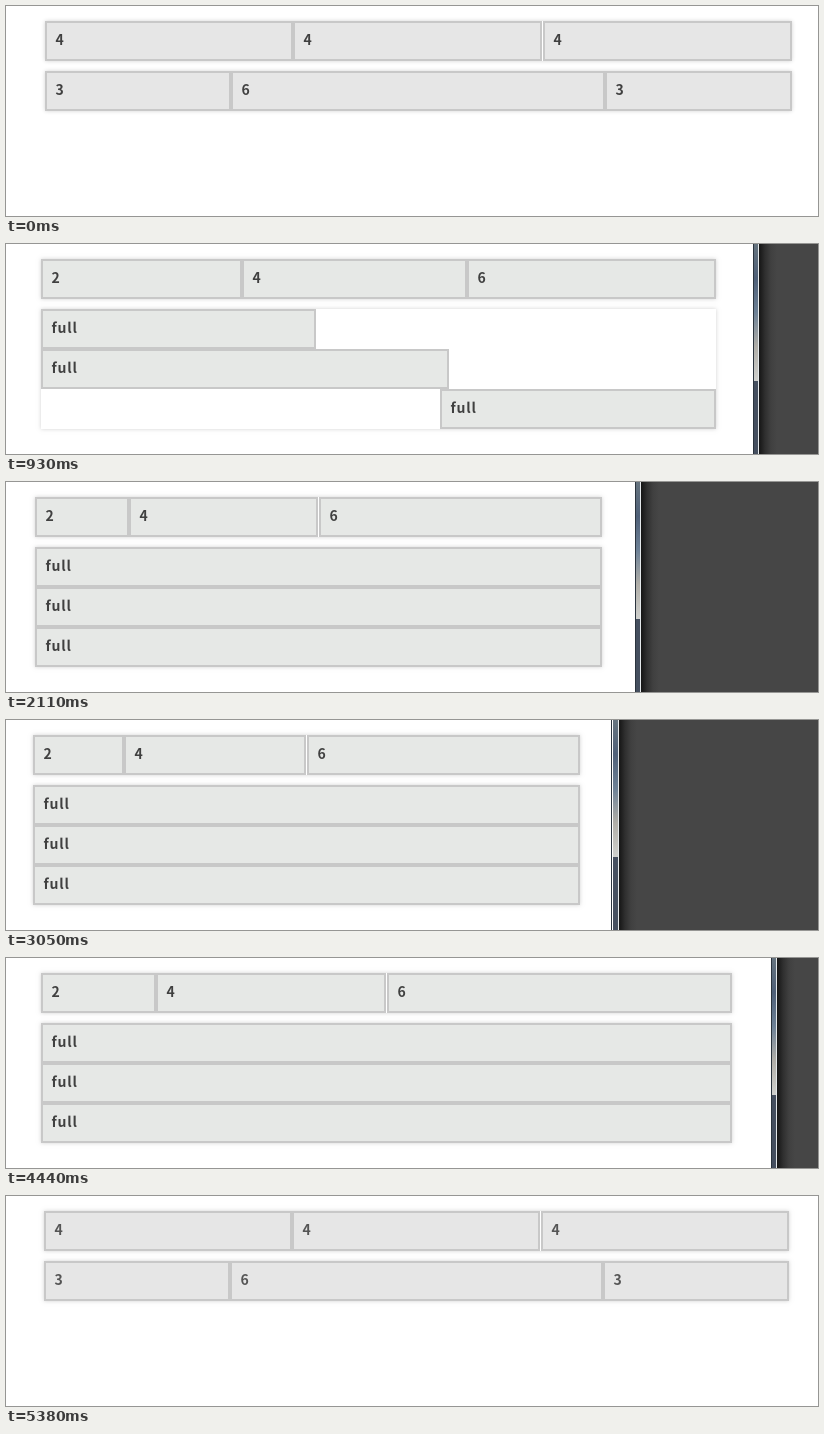
Recreate the animation shown at these times as an HTML page with a canvas. Size 812 by 210 pixels, loop 5.54 s.

```html
<!DOCTYPE html>
<html lang="en">
<head>
<meta charset="utf-8">
<title>Responsive grid</title>
<style>
html, body { margin: 0; width: 100%; height: 100%; overflow: hidden; background: #fff; }
canvas { display: block; }
</style>
</head>
<body>
<canvas id="stage" width="812" height="210"></canvas>
<script>
const ctx = document.getElementById('stage').getContext('2d');
const WIDTH = 812, HEIGHT = 210, LOOP = 5540;
const FRAME = 208;            // longest hold while the window is dragged
const SHRINK_AT = 849, GROW_AT = 4700, DURATION = 500;

// Key poses of the drag: time, page width, distance from page to window border
const keys = [
  [0, 824.5, 10], [310, 821, 10], [930, 744.65, 8], [2110, 625.1, 10],
  [2480, 601.1, 12], [3050, 601.1, 12], [3820, 686.25, 13],
  [4440, 761.05, 10], [5210, 820, 11], [5380, 821, 11]
];

const rows = [
  { y: 15, wide: [.333, .333, .333], small: [.166, .333, .5],
    wideText: ['4', '4', '4'], smallText: ['2', '4', '6'] },
  { y: 65, wide: [.25, .5, .25], small: [1, 1, 1],
    wideText: ['3', '6', '3'], smallText: ['full', 'full', 'full'] }
];

const mix = (a, b, p) => a + (b - a) * p;

// The drag is seen in equal jumps between two key poses
function poseAt(time) {
  const i = keys.findLastIndex(k => k[0] <= time);
  const from = keys[i], to = keys[i + 1];
  if (!to) return from;
  const span = to[0] - from[0], count = Math.round(span / FRAME);
  const p = Math.floor((time - from[0]) / span * count) / count;
  return from.map((v, n) => mix(v, to[n], p));
}

// CSS "ease" curve, solved by bisection
function ease(x) {
  if (x <= 0) return 0;
  if (x >= 1) return 1;
  let lo = 0, hi = 1;
  for (let i = 0; i < 24; i++) {
    const s = (lo + hi) / 2;
    if (.75 * s * (1 - s) + s ** 3 < x) lo = s; else hi = s;
  }
  return .3 * lo * (1 - lo) ** 2 + 3 * lo * lo * (1 - lo) + lo ** 3;
}

function rect(x, y, w, h, color) {
  ctx.fillStyle = color;
  ctx.fillRect(x, y, w, h);
}

// Left floats with the last cell floated right, wrapping when a line is full
function place(widths, left, right) {
  const total = right - left;
  let x = left, line = 0;
  return widths.map((share, i) => {
    const w = share * total;
    if (x + w > right + .01) { x = left; line++; }
    const start = i === widths.length - 1 ? right - w : x;
    x += w;
    return { x0: Math.round(start), x1: Math.round(start + w), line };
  });
}

function drawRow(row, left, right, p, look) {
  const cells = place(row.wide.map((w, i) => mix(w, row.small[i], p)), left, right);
  const texts = look.small ? row.smallText : row.wideText;
  const x0 = Math.round(left), x1 = Math.round(right);

  ctx.save();
  ctx.shadowColor = 'rgba(0,0,0,.18)';
  ctx.shadowBlur = 4;
  rect(x0, row.y, x1 - x0, 40 * (cells[2].line + 1), '#fff');
  ctx.restore();

  cells.forEach((c, i) => {
    const y = row.y + 40 * c.line, w = c.x1 - c.x0;
    rect(c.x0, y, w, 40, '#c8c8c8');
    rect(c.x0 + 2, y + 2, w - 4, 36, look.fill);
    ctx.fillStyle = look.ink;
    ctx.fillText(texts[i], c.x0 + 10.5, y + 24);
  });
}

function gradient(x0, y0, x1, y1, colors) {
  const g = ctx.createLinearGradient(x0, y0, x1, y1);
  colors.forEach((c, i) => g.addColorStop(i / (colors.length - 1), c));
  return g;
}

function drawWindowEdge(pageEnd, x) {
  const glass = ['#66747f', '#4f6078', '#6d8196', '#b0aea8', '#cfd0cd'];
  rect(x - 6, 0, 5, 137, gradient(0, 0, 0, 137, glass));
  rect(x - 6, 137, 5, HEIGHT, '#454f5f');
  rect(Math.min(pageEnd, x - 6), 0, 1, HEIGHT, '#2b343e');
  rect(x - 1, 0, 1, HEIGHT, '#e4e8ea');
  rect(x, 0, WIDTH, HEIGHT, '#464646');
  rect(x, 0, 18, HEIGHT, gradient(x, 0, x + 18, 0, ['#151515', '#2f2f2f', '#404040', '#464646']));
}

function draw(time) {
  const [t, page, gap] = poseAt(time);
  const p = ease((t - SHRINK_AT) / DURATION) - ease((t - GROW_AT) / DURATION);
  const small = t > SHRINK_AT && t < GROW_AT;
  const look = {
    small,
    fill: small ? '#e6e8e6' : '#e6e6e6',
    ink: t > GROW_AT ? '#555' : '#404040'
  };

  rect(0, 0, WIDTH, HEIGHT, '#fff');
  ctx.font = '700 14px "Noto Sans CJK JP", "Noto Sans CJK SC", "Open Sans", sans-serif';
  ctx.letterSpacing = '0.8px';
  for (const row of rows) drawRow(row, .05 * page - 2.56, .95 * page + 2.56, p, look);
  drawWindowEdge(Math.round(page + 4), Math.round(page + gap));
}

const begin = performance.now();
function tick() {
  draw((performance.now() - begin) % LOOP);
  requestAnimationFrame(tick);
}
tick();
</script>
</body>
</html>
```
